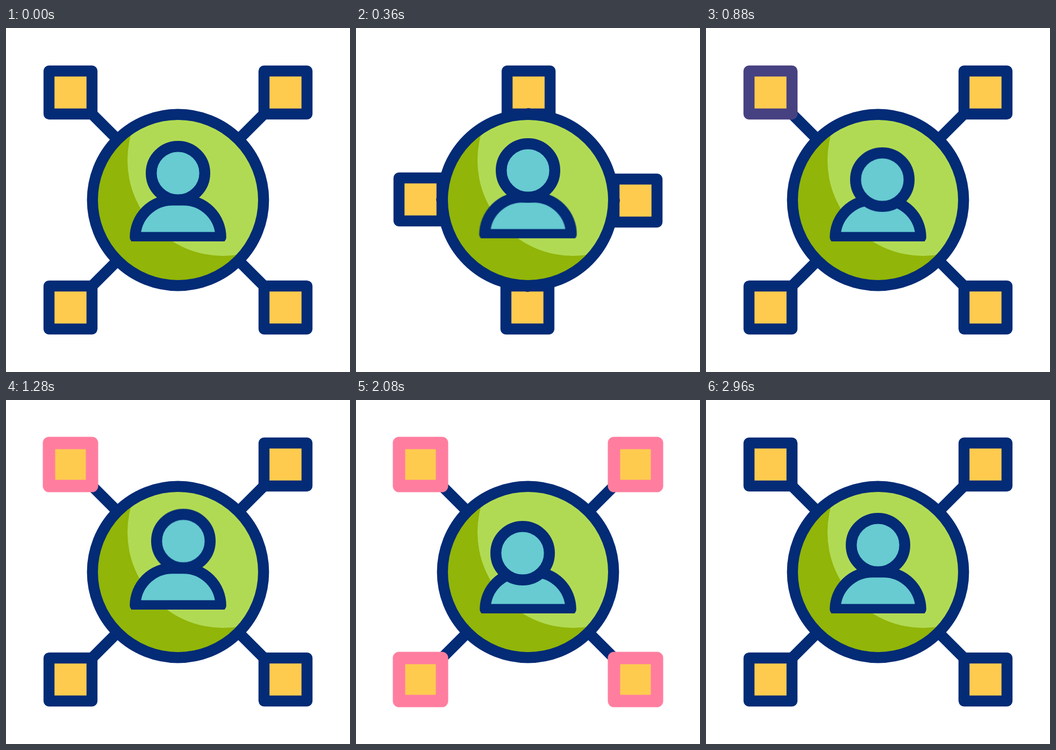
These frames come from a looping animation (640x640 px, 3 s). An HTML page:

```html
<!DOCTYPE html>
<html lang="en">
<head>
<meta charset="utf-8">
<title>User network</title>
<style>
  :root {
    --navy: #032b76;
    --ease: cubic-bezier(.333, 0, .667, 1);
  }
  html, body { margin: 0; width: 100%; height: 100%; overflow: hidden; background: #fff; }
  svg { display: block; width: 100%; height: 100%; }

  .ink { stroke: var(--navy); stroke-width: 20.4; stroke-linejoin: round; stroke-linecap: round; }
  .yellow { fill: #ffcb4f; }
  .teal { fill: #67cbd1; }
  .glow { fill: none; stroke: #ff7e9f; stroke-width: 20px; stroke-linejoin: round; opacity: 0; }

  .node, .spoke, .glow, .body, .head-x, .head-y {
    animation: 3s var(--ease) infinite both;
  }

  /* Each arm slides one side clockwise; the four arms are quarter turns of it */
  .node { animation-name: slide; }
  .spoke { animation-name: swing; }
  @keyframes slide {
    0%, 2.667% { transform: translateX(0); }
    21.333%, 100% { transform: translateX(400px); }
  }
  @keyframes swing {
    0%, 2.667% { d: path("M320 320L159.3 159.3"); }
    21.333%, 100% { d: path("M320 320L480.7 159.3"); }
  }

  .body { animation-name: lift; transform-origin: 320px 0; }
  @keyframes lift {
    0%, 2.667% { transform: translateY(0) scaleX(1); }
    12% { transform: translateY(-5.5px) scaleX(1.011); }
    20% { transform: translateY(0) scaleX(1.003); }
    22.667%, 38% { transform: translateY(0) scaleX(1); }
    46.667%, 60.667% { transform: translateY(-12.5px) scaleX(1); }
    69.333%, 100% { transform: translateY(0) scaleX(1); }
  }

  .head-x { animation-name: head-x; }
  @keyframes head-x {
    0%, 22.667% { transform: translateX(0); }
    32%, 51.333% { transform: translateX(10px); }
    60% { transform: translateX(-10px); }
    70% { transform: translateX(-10px); animation-timing-function: cubic-bezier(.77, 0, .7, 1); }
    98.667%, 100% { transform: translateX(0); }
  }

  .head-y { animation-name: head-y; }
  @keyframes head-y {
    0%, 2.667% { transform: translateY(0); }
    12% { transform: translateY(-5px); }
    20% { transform: translateY(.5px); }
    22.667% { transform: translateY(0); }
    32%, 38% { transform: translateY(15px); }
    46.667%, 60.667% { transform: translateY(-25px); }
    69.333% { transform: translateY(15px); }
    70% { transform: translateY(15px); animation-timing-function: cubic-bezier(.6, 0, .667, 1); }
    98.667%, 100% { transform: translateY(0); }
  }

  /* Nodes light up one after another and fade together */
  .tl { animation-name: glow-tl; }
  .tr { animation-name: glow-tr; }
  .br { animation-name: glow-br; }
  .bl { animation-name: glow-bl; }
  @keyframes glow-tl {
    0%, 28% { opacity: 0; stroke-width: 20px; }
    32% { opacity: 1; stroke-width: 23px; }
    70% { opacity: 1; stroke-width: 23px; animation-timing-function: cubic-bezier(.6, 0, .667, 1); }
    98.667%, 100% { opacity: 0; stroke-width: 20px; }
  }
  @keyframes glow-tr {
    0%, 42.667% { opacity: 0; stroke-width: 20px; }
    46.667% { opacity: 1; stroke-width: 23px; }
    70% { opacity: 1; stroke-width: 23px; animation-timing-function: cubic-bezier(.6, 0, .667, 1); }
    98.667%, 100% { opacity: 0; stroke-width: 20px; }
  }
  @keyframes glow-br {
    0%, 56% { opacity: 0; stroke-width: 20px; }
    60% { opacity: 1; stroke-width: 23px; }
    70% { opacity: 1; stroke-width: 23px; animation-timing-function: cubic-bezier(.6, 0, .667, 1); }
    98.667%, 100% { opacity: 0; stroke-width: 20px; }
  }
  @keyframes glow-bl {
    0%, 65.333% { opacity: 0; stroke-width: 20px; }
    69.333% { opacity: 1; stroke-width: 23px; }
    70% { opacity: 1; stroke-width: 23px; animation-timing-function: cubic-bezier(.6, 0, .667, 1); }
    98.667%, 100% { opacity: 0; stroke-width: 20px; }
  }
</style>
</head>
<body>
<svg viewBox="0 0 640 640">
  <defs>
    <clipPath id="disc"><circle cx="320" cy="320" r="159"/></clipPath>
    <clipPath id="hem"><rect x="200" y="280" width="240" height="117"/></clipPath>
  </defs>

  <g>
    <rect class="node ink yellow" x="80" y="80" width="80" height="80"/>
    <path class="spoke ink" d="M320 320L159.3 159.3"/>
  </g>
  <g transform="rotate(90 320 320)">
    <rect class="node ink yellow" x="80" y="80" width="80" height="80"/>
    <path class="spoke ink" d="M320 320L159.3 159.3"/>
  </g>
  <g transform="rotate(180 320 320)">
    <rect class="node ink yellow" x="80" y="80" width="80" height="80"/>
    <path class="spoke ink" d="M320 320L159.3 159.3"/>
  </g>
  <g transform="rotate(270 320 320)">
    <rect class="node ink yellow" x="80" y="80" width="80" height="80"/>
    <path class="spoke ink" d="M320 320L159.3 159.3"/>
  </g>

  <g clip-path="url(#disc)">
    <circle cx="320" cy="320" r="159" fill="#91b508"/>
    <circle cx="404" cy="246" r="178" fill="#b1da54"/>
  </g>
  <circle class="ink" cx="320" cy="320" r="159.2" fill="none"/>

  <g class="body">
    <g clip-path="url(#hem)">
      <path class="ink teal" d="M240.4 389.6A69.6 69.6 0 0 1 310 320H330A69.6 69.6 0 0 1 399.6 389.6Z"/>
    </g>
  </g>
  <g class="head-x">
    <g class="head-y"><circle class="ink teal" cx="320" cy="270" r="49.8"/></g>
  </g>

  <rect class="glow tl" x="80" y="80" width="80" height="80"/>
  <rect class="glow tr" x="480" y="80" width="80" height="80"/>
  <rect class="glow br" x="480" y="480" width="80" height="80"/>
  <rect class="glow bl" x="80" y="480" width="80" height="80"/>
</svg>
</body>
</html>
```
